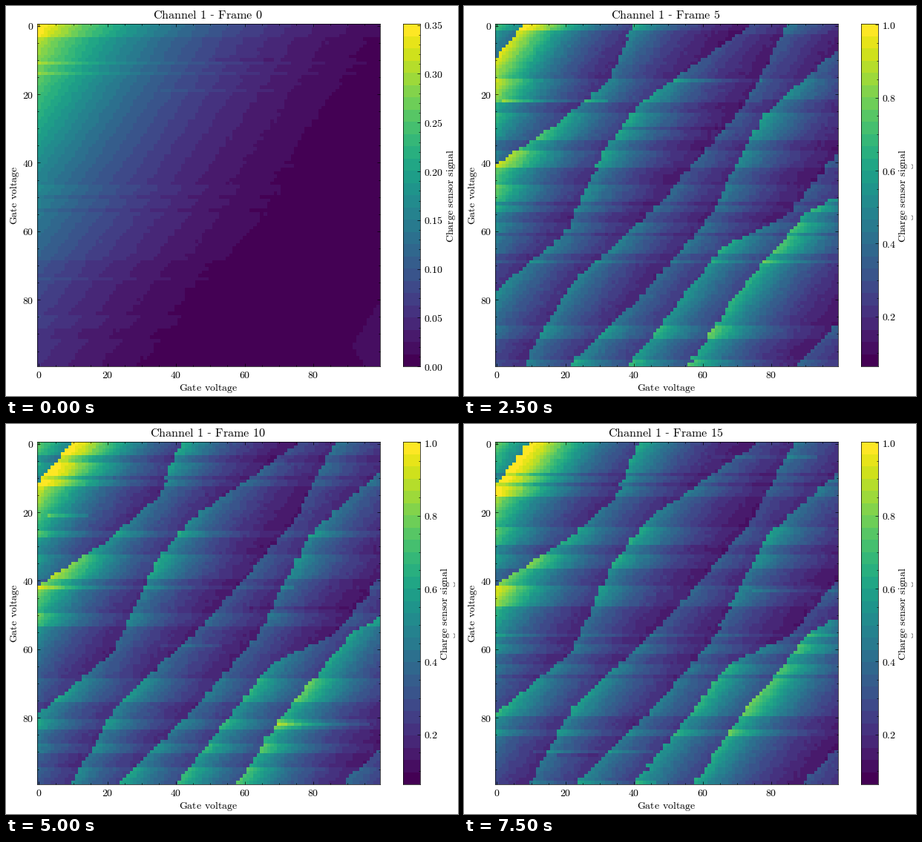
Animation of 609x526 px, one loop 8000 ms. Source, as a matplotlib script:

```python
import numpy as np
import matplotlib.pyplot as plt
from matplotlib.animation import FuncAnimation
from matplotlib.ticker import AutoMinorLocator, MultipleLocator
from matplotlib.transforms import Bbox

W, H, DPI = 609, 526, 100
FRAMES, N, LEVELS = 16, 100, 28

plt.rcParams.update({
    "font.family": "DejaVu Serif", "mathtext.fontset": "cm", "font.size": 10,
    "axes.linewidth": 0.5,
})

# Key points (column, row) of each charge transition
LINES = [
    [(8, 0), (-8, 20)],
    [(40, 0), (33, 16.5), (19, 28.4), (-14, 50)],
    [(75, 0), (42, 23), (32, 36), (20, 61.5), (-5, 82)],
    [(85, 0), (73, 23), (48, 52), (21, 77), (8, 100)],
    [(108, 0), (77.5, 27), (62, 57), (42, 80), (21, 100)],
    [(118, 15), (85, 56), (66, 65), (55, 79), (38.5, 100)],
    [(118, 40), (90, 55.5), (69, 80.5), (56, 100)],
    [(110, 75), (97.5, 90), (87, 100)],
]

x = np.arange(N) + 0.5
y = x[:, None]


def sensor_noise(rng):
    """Row-wise telegraph noise plus a few short streaks."""
    shift = np.empty((N, N))
    bright = True
    for row in shift:
        row[:] = -2.5 if bright else 1.5
        if rng.random() < (0.2 if bright else 0.13):
            bright = not bright
    for _ in range(5):
        row, col, length = rng.integers([0, 0, 8], [N, 80, 40])
        shift[row, col:col + length] += rng.choice([-4, 4])
    return shift


def first_map(rng):
    t = x + 0.6 * y + 0.0013 * y**2 + sensor_noise(rng)
    v = 0.375 * np.exp(-t / 46) - 0.03
    corner = (y > 82) & (x > 92 + 0.58 * np.abs(y - 94))
    v = np.maximum(v, 0) + 0.02 * corner
    return v + rng.normal(0, 0.0006, v.shape)


def stability_map(i, rng):
    u = x - 1 - np.tanh(i - 6)
    region = np.zeros((N, N), int)
    for line in LINES:
        cols, rows = zip(*line)
        region += u >= np.interp(y, rows, cols) + rng.normal(0, 0.25, (N, 1))
    # Each added electron sets the sensor potential back by one step
    s = u + 0.75 * y + 15.5 - 18.8 * region + sensor_noise(rng)
    v = 1.05 / (1 + (np.maximum(s, 0) / 21) ** 2) - 0.03
    return v + rng.normal(0, 0.006, v.shape)


def signal(i):
    rng = np.random.default_rng(40 + i)
    return stability_map(i, rng) if i else first_map(rng)


def limits(i):
    if i == 0:
        return 0, 0.351
    return 0.063, 0.996 if i % 6 == 1 else 1.002


def tex(s):
    return r"$\mathrm{" + s.replace(" ", r"\hspace{0.38}") + "}$"


fig = plt.figure(figsize=(W / DPI, H / DPI), dpi=DPI, facecolor="white")


def add_axes(x0, x1):
    return fig.add_axes([x0 / W, 1 - 486.3 / H, (x1 - x0) / W, 462 / H])


def label(px, py, s, **kw):
    return fig.text(px / W, 1 - py / H, s, ha="center", va="baseline",
                    rotation_mode="anchor", **kw)


cmap = plt.get_cmap("viridis", LEVELS)
ax = add_axes(42, 504)
image = ax.imshow(np.zeros((N, N)), cmap=cmap, aspect="auto",
                  interpolation="nearest")
cax = add_axes(535, 558)
bar = cax.imshow(np.arange(LEVELS)[:, None], cmap=cmap, aspect="auto",
                 origin="lower", interpolation="nearest")

for axis in (ax.xaxis, ax.yaxis):
    axis.set_major_locator(MultipleLocator(20))
    axis.set_minor_locator(MultipleLocator(5))
    axis.set_major_formatter(lambda v, _: tex(f"{v:.0f}"))
cax.set_xticks([])
cax.yaxis.tick_right()
cax.yaxis.set_minor_locator(AutoMinorLocator())
for a in (ax, cax):
    a.tick_params(which="both", direction="in", width=0.5, pad=3.5)
    a.tick_params(which="major", length=3)
    a.tick_params(which="minor", length=1.5)
ax.tick_params(which="both", top=True, right=True)

title = label(272.3, 17, "", fontsize=11.6)
label(272.5, 519, tex("Gate voltage"))
label(14.5, 255, tex("Gate voltage"), rotation=90)
wide_label = label(602.5, 256, tex("Charge sensor signal"), rotation=90)
near_label = label(595.3, 256, tex("Charge sensor signal"), rotation=90)
wide_label.set_clip_on(True)


def draw(i):
    lo, hi = limits(i)
    image.set_data(signal(i))
    image.set_clim(lo, hi)
    bar.set_extent([0, 1, lo, hi])
    cax.set_ylim(lo, hi)
    step, digits = (0.2, 1) if i else (0.05, 2)
    cax.yaxis.set_major_locator(MultipleLocator(step))
    cax.yaxis.set_major_formatter(lambda v, _: tex(f"{v:.{digits}f}"))
    title.set_text(tex("Channel 1 ") + "-" + tex(f" Frame {i}"))
    # After the first step only the rightmost sliver of the wide label remains
    near_label.set_visible(i > 0)
    wide_label.set_clip_box(Bbox([[603 if i else 0, 0], [W, H]]))
    return image, bar, title, wide_label, near_label


anim = FuncAnimation(fig, draw, frames=FRAMES, interval=500, repeat=True,
                     init_func=lambda: draw(0), blit=False)
plt.show()
```
